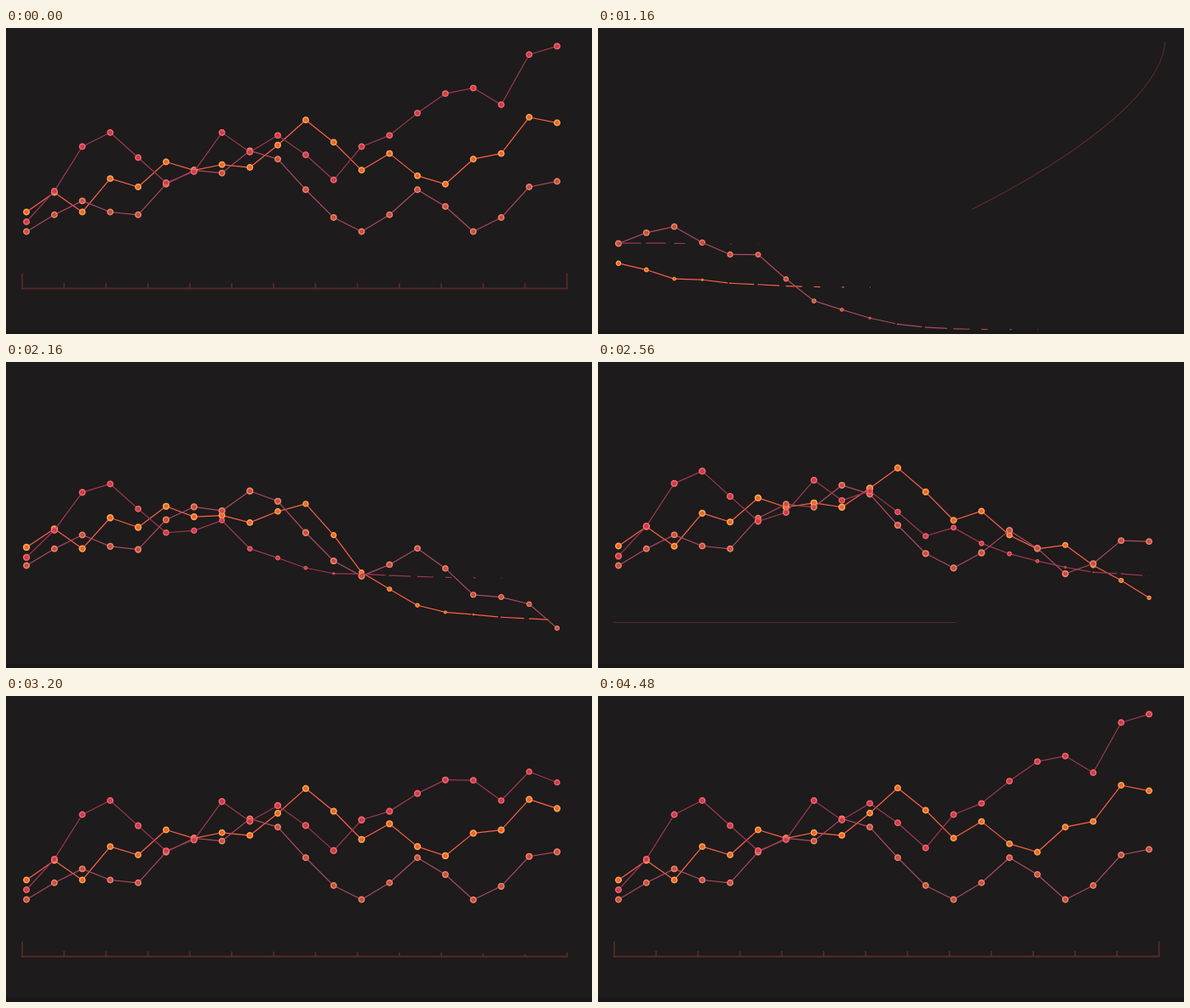
An HTML page that plays this animation: 688x360 px, repeating every 5520 ms.

```html
<!DOCTYPE html>
<html lang="en">
<head>
<meta charset="utf-8">
<title>Line chart</title>
<style>
  html, body { margin: 0; width: 100%; height: 100%; overflow: hidden; background: #1d1b1b; }
  svg { display: block; width: 100%; height: 100%; }
</style>
</head>
<body>
<svg id="stage" viewBox="0 0 688 360" fill="none"></svg>
<script>
const LOOP = 5520, STEP = 80, LONG = 2080, SHORT = 1040;
const UNIT = 3.279, ZERO = 216.5, LEFT = 24, GAP = 32.79;
const AXIS = '#57292b';

const stage = document.getElementById('stage');

function add(parent, tag, attrs) {
  const node = document.createElementNS('http://www.w3.org/2000/svg', tag);
  set(node, attrs);
  parent.appendChild(node);
  return node;
}

function set(node, attrs) {
  for (const key in attrs) node.setAttribute(key, attrs[key]);
}

const clamp = v => Math.min(1, Math.max(0, v));
const cubic = (s, p1, p2) => 3 * s * (1 - s) ** 2 * p1 + 3 * s * s * (1 - s) * p2 + s ** 3;

// Steep ease with a long tail, solved by bisection
function ease(u) {
  if (u <= 0) return 0;
  if (u >= 1) return 1;
  let lo = 0, hi = 1;
  for (let n = 0; n < 22; n++) {
    const mid = (lo + hi) / 2;
    if (cubic(mid, 0.597, 0.013) < u) lo = mid; else hi = mid;
  }
  return cubic(lo, 0.012, 1);
}

const tween = (t, start, length) => ease((t - start) / length);

// Swooping arc
const arc = add(stage, 'path', {
  d: 'M19 355C230 330 666 140 666 12', pathLength: 1, stroke: AXIS, 'stroke-width': 1.2
});

// Axis and ticks
const axis = add(stage, 'line', { x1: 18, y1: 306.5, y2: 306.5, stroke: AXIS });
const ticks = Array.from({ length: 14 }, (_, i) => {
  const x = 19 + i * 49.2;
  return {
    height: i % 13 ? 6.5 : 18,
    node: add(stage, 'line', { x1: x, x2: x, y1: 306.5, stroke: AXIS, 'stroke-width': 1.8 })
  };
});

function makeSeries(base, delay, line, fill, ring, values) {
  const group = add(stage, 'g', {});
  const segs = values.slice(1).map(() => add(group, 'line', { stroke: line, 'stroke-width': 1.2 }));
  const dots = values.map(() => add(group, 'circle', { r: 3.2, fill, stroke: ring, 'stroke-width': 1.5 }));
  return { base, delay, segs, dots, ends: values.map(v => ZERO - v * UNIT) };
}

const series = [
  makeSeries(305, 480, '#fb5f4b', '#e9662f', '#ffa452',
    [0, 7, 0, 12, 9, 18, 15, 17, 16, 24, 33, 25, 15, 21, 13, 10, 19, 21, 34, 32]),
  makeSeries(355, 0, '#a94a62', '#c44d49', '#ec8363',
    [-7, -1, 4, 0, -1, 10, 15, 14, 22, 19, 8, -2, -7, -1, 8, 2, -7, -2, 9, 11]),
  makeSeries(254, 840, '#9c3852', '#c73c50', '#f2656a',
    [-3.5, 7.5, 23.5, 28.5, 19.5, 10.5, 14.5, 28.5, 21.5, 27.5,
      20.5, 11.5, 23.5, 27.5, 35.5, 42.5, 44.5, 38.5, 56.5, 59.5])
];

// Darker strip below the chart
add(stage, 'rect', { y: 355.5, width: 688, height: 4.5, fill: '#191717' });

function drawSeries(s, t) {
  const pts = s.ends.map((end, i) => {
    const start = 20 + s.delay + i * STEP;
    return {
      start,
      x: LEFT + i * GAP,
      y: s.base + (end - s.base) * tween(t, start, LONG)
    };
  });
  pts.forEach((p, i) => {
    const settle = clamp((t - p.start - 1450) / 640);
    const scale = tween(t, p.start - 264, LONG) * (1.07 - 0.07 * settle);
    set(s.dots[i], { transform: `translate(${p.x} ${p.y}) scale(${scale})` });
    if (!s.segs[i]) return;
    const q = pts[i + 1], f = tween(t, p.start - 204, SHORT);
    set(s.segs[i], {
      x1: p.x, y1: p.y,
      x2: p.x + (q.x - p.x) * f, y2: p.y + (q.y - p.y) * f,
      visibility: f > 0.01 ? 'visible' : 'hidden'
    });
  });
}

function draw(t) {
  const head = tween(t, 20, 1300), tail = tween(t, 840, 860);
  set(arc, {
    'stroke-dasharray': `${Math.max(0, head - tail)} 2`,
    'stroke-dashoffset': -tail,
    visibility: head - tail > 0.002 ? 'visible' : 'hidden'
  });

  const u = clamp((t - 2160) / SHORT);
  set(axis, {
    x2: 18 + 641.5 * ease(u),
    'stroke-width': u > 0 ? 0.4 + 1.5 * u : 0
  });
  ticks.forEach((tick, i) => {
    const f = tween(t, 2365 + i * 40, SHORT);
    set(tick.node, { y2: 306.5 - tick.height * f });
  });

  series.forEach(s => drawSeries(s, t));
}

const begin = performance.now();
function tick() {
  const t = (performance.now() - begin) % LOOP;
  // The finished chart holds briefly before the restart
  draw(t < 40 ? LOOP : t);
  requestAnimationFrame(tick);
}
tick();
</script>
</body>
</html>
```
